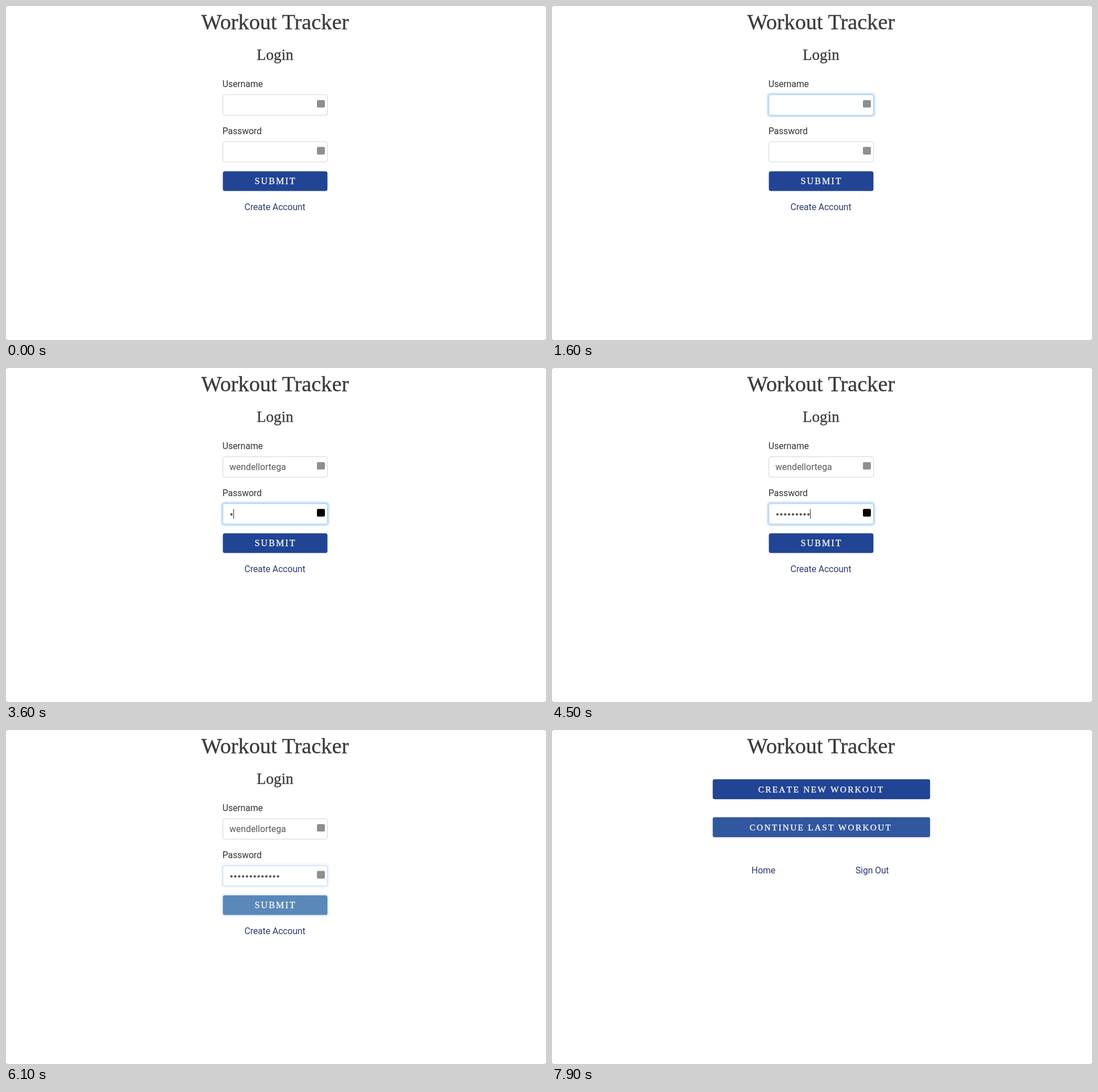
Write an HTML page that moves like this. It is 950 by 589 pixels and loops after 8000 ms.

```html
<!DOCTYPE html>
<html lang="en">
<head>
<meta charset="utf-8">
<title>Workout Tracker</title>
<style>
  html, body { margin: 0; width: 100%; height: 100%; overflow: hidden; background: #fff; }
  svg { display: block; width: 950px; height: 589px; }
  text { white-space: pre; }
  .title, .heading { font-family: "Liberation Serif", Times, serif; fill: #3b3b3b; stroke: #3b3b3b; stroke-width: .35; }
  .title { font-size: 38.3px; }
  .heading { font-size: 27px; }
  .label, .value, .link { font: 15.8px Roboto, "Open Sans", sans-serif; letter-spacing: -.1px; }
  .label { fill: #333; }
  .value { fill: #595959; letter-spacing: 0; }
  .link { fill: #2c3c6c; }
  .caption { font: 15.4px "Liberation Serif", Times, serif; letter-spacing: 2.25px; font-kerning: none; fill: #fff; stroke: #fff; stroke-width: .3; }
  .submit { font-size: 16px; letter-spacing: 2.1px; }
  .box { fill: #fff; stroke-width: 1; }
  .ring { fill: none; stroke: #d0e5f8; stroke-width: 3.6; }
  .button { fill: #224495; stroke: #1f3f8b; }
  .caret { fill: #333; }
  .dots { fill: #595959; }
  .corner { fill: #a8a8a8; }
</style>
</head>
<body>
<svg viewBox="0 0 950 589">
  <path class="corner" d="M0 0h2L0 2zM950 0h-2l2 2zM0 589h2l-2-2zM950 589h-2l2-2z"/>
  <text class="title" x="343.6" y="41">Workout Tracker</text>

  <g id="login">
    <text class="heading" x="441" y="95">Login</text>

    <text class="label" x="380.8" y="143">Username</text>
    <rect class="ring" id="userRing" x="379.7" y="154.7" width="187.6" height="39.6" rx="5"/>
    <rect class="box" id="userBox" x="381.5" y="156.5" width="184" height="36" rx="3.5"/>
    <rect id="userIcon" x="547" y="166" width="14" height="13" rx="2"/>
    <text class="value" id="userText" x="393" y="180"></text>
    <rect class="caret" id="userCaret" y="166" width="1" height="18"/>

    <text class="label" x="380.8" y="225.5">Password</text>
    <rect class="ring" id="passRing" x="379.7" y="237.4" width="187.6" height="39.6" rx="5"/>
    <rect class="box" id="passBox" x="381.5" y="239.3" width="184" height="35.7" rx="3.5"/>
    <rect id="passIcon" x="547" y="248.5" width="14" height="13.5" rx="2"/>
    <g class="dots" id="dots"></g>
    <rect class="caret" id="passCaret" y="248.5" width="1" height="17.5"/>

    <rect class="ring" id="submitRing" x="380" y="290" width="187" height="38" rx="4"/>
    <rect class="button" id="submit" x="382" y="292" width="183" height="33.8" rx="2.5"/>
    <text class="caption submit" x="437.6" y="314">SUBMIT</text>
    <text class="link" x="419.5" y="360">Create Account</text>
  </g>

  <g id="menu">
    <rect class="button" x="283.2" y="87.3" width="381.5" height="34.3" rx="2.5"/>
    <text class="caption" x="362.7" y="109.5">CREATE NEW WORKOUT</text>
    <rect class="button" id="resume" x="283.2" y="154.3" width="381.5" height="34.3" rx="2.5"/>
    <text class="caption" x="347.5" y="176.5">CONTINUE LAST WORKOUT</text>
    <text class="link" x="351" y="253">Home</text>
    <text class="link" x="534" y="253">Sign Out</text>
  </g>
</svg>
<script>
const LOOP = 8000, FADE = 150;
const USER_FOCUS = 1450, PASS_FOCUS = 3350, PRESS = 6000, NEXT_PAGE = 6500;
const SUBMIT_HOVER = 5800, RESUME_HOVER = 7860;
const NAME = "wendellortega";
const DOT_GAP = 6.83;

const el = id => document.getElementById(id);
const keys = (start, step, count) => Array.from({ length: count }, (_, i) => start + i * step);
const userKeys = [...keys(1850, 75, 8), ...keys(2600, 110, 5)];
const passKeys = keys(3550, 112, 13);

el("dots").innerHTML = passKeys.map((_, i) =>
  `<circle cx="${396.6 + i * DOT_GAP}" cy="258.2" r="2.1"/>`).join("");
const dots = [...el("dots").children];

const ramp = (t, start) => Math.min(1, Math.max(0, (t - start) / FADE));
const mix = (a, b, k) => `rgb(${a.map((v, i) => Math.round(v + (b[i] - v) * k))})`;
const typed = (list, t) => list.filter(key => key <= t).length;
const show = (node, on) => node.style.display = on ? "" : "none";

const IDLE = [211, 214, 218], FOCUS = [160, 202, 238];
const BLUE = [34, 68, 149], LIGHT = [90, 136, 185];
const EDGE = [31, 63, 139], LIGHT_EDGE = [84, 130, 180];

function paintField(name, t, start, end) {
  const glow = ramp(t, start) - ramp(t, end);
  el(name + "Ring").style.opacity = glow;
  el(name + "Box").style.stroke = mix(IDLE, FOCUS, glow);
  el(name + "Icon").style.fill = t >= start + 200 && t < end ? "#000" : "#8f8f8f";
}

function paintCaret(name, t, start, end, list, x) {
  const last = Math.max(start, ...list.filter(key => key <= t));
  const caret = el(name + "Caret");
  caret.setAttribute("x", x);
  show(caret, t >= start && t < end && (t - last) % 1000 < 500);
}

function paintButton(id, hover) {
  el(id).style.fill = mix(BLUE, LIGHT, hover);
  el(id).style.stroke = mix(EDGE, LIGHT_EDGE, hover);
}

function draw(t) {
  show(el("login"), t < NEXT_PAGE);
  show(el("menu"), t >= NEXT_PAGE);

  if (t < NEXT_PAGE) {
    const text = el("userText");
    const letters = typed(userKeys, t), count = typed(passKeys, t);
    text.textContent = NAME.slice(0, letters);
    const end = letters ? text.getComputedTextLength() : 0;
    dots.forEach((dot, i) => show(dot, i < count));

    paintField("user", t, USER_FOCUS, PASS_FOCUS);
    paintField("pass", t, PASS_FOCUS, PRESS);
    paintCaret("user", t, USER_FOCUS + 200, PASS_FOCUS, userKeys, Math.round(393 + end));
    paintCaret("pass", t, PASS_FOCUS, PRESS, passKeys, Math.round(393 + count * DOT_GAP));
    paintButton("submit", ramp(t, SUBMIT_HOVER));
    el("submitRing").style.opacity = ramp(t, PRESS + 50);
  }
  paintButton("resume", ramp(t, RESUME_HOVER));
}

function tick() {
  draw(performance.now() % LOOP);
  requestAnimationFrame(tick);
}
tick();
</script>
</body>
</html>
```
